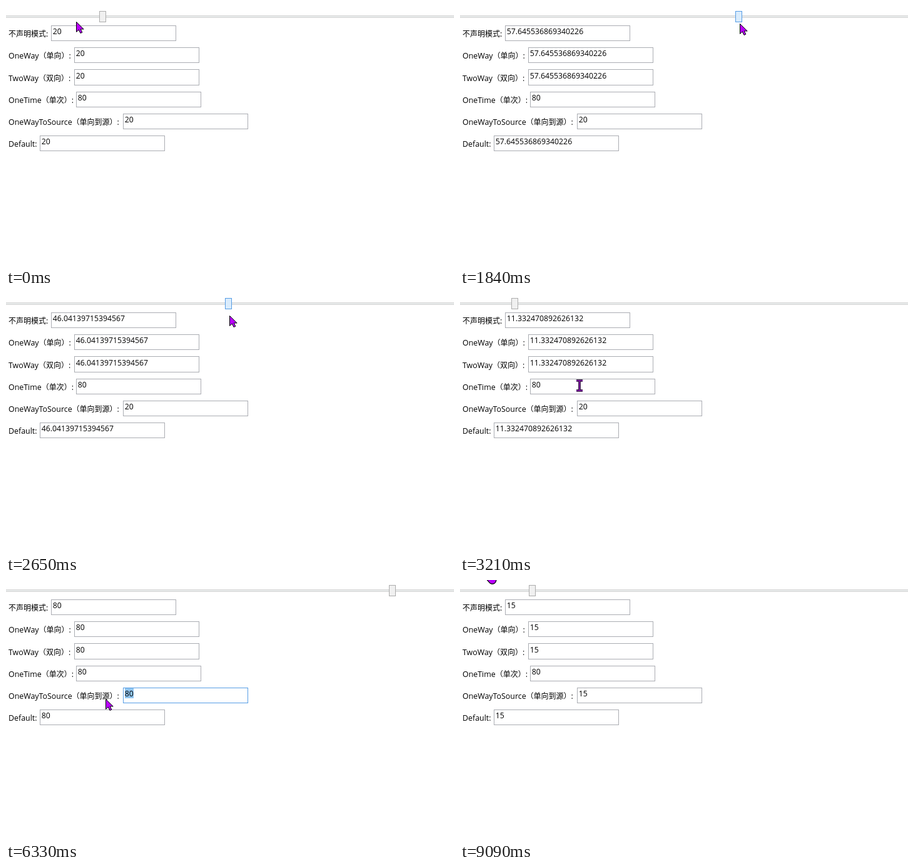
An HTML page that plays this animation: 716 by 414 pixels, repeating every 9.18 s.

```html
<!DOCTYPE html>
<html lang="zh-CN">
<head>
<meta charset="utf-8">
<title>Binding modes</title>
<style>
html, body { margin: 0; width: 100%; height: 100%; overflow: hidden; background: #fff; }
svg { display: block; }
text { font: 12.4px "Open Sans", "Noto Sans", sans-serif; fill: #000; white-space: pre; }
.value { font-size: 12.25px; }
.cjk { font: 12px "Noto Sans CJK SC", "Noto Sans CJK", sans-serif; }
rect { shape-rendering: crispEdges; }
</style>
</head>
<body>
<svg id="stage" width="716" height="414" viewBox="0 0 716 414"></svg>
<script>
const LOOP = 9180, STEPS = 100;
const ONCE = 3, SOURCE = 4;
const stage = document.getElementById('stage');

const ROWS = [
  { label: '不声明模式:', x: 72 },
  { label: 'OneWay（单向）:', x: 109 },
  { label: 'TwoWay（双向）:', x: 109 },
  { label: 'OneTime（单次）:', x: 112 },
  { label: 'OneWayToSource（单向到源）:', x: 187 },
  { label: 'Default:', x: 54 }
];

// Moments in the story, in steps
const GRAB = 15, RELEASE = 33, SELECT = 41, TYPE = 52, COMMIT = 60;
const RESELECT = 66, RETYPE = 75, RECOMMIT = 83, BLUR = 99;

// Pointer gestures: first step, last step, destination
const HOME = [112, 25];
const GESTURES = [
  [0, 3, 214, 180], [3, 6, 176, 15], [9, 14, 156, 15], [GRAB, 32, 89, 18],
  [RELEASE, 35, 191, 148], [35, 38, 208, 181], [SELECT, 42, 180, 186],
  [53, 58, 200, 149], [61, 64, 208, 181], [RESELECT, 69, 159, 190],
  [77, RECOMMIT, 192, 148], [87, 96, 51, 0]
];

// Slider values where the drag turns: step, value
const DRAG = [
  [GRAB, 20], [20, 57.645536869340226], [25, 5.510996119016816],
  [26, 7.183958602846054], [29, 46.04139715394567], [32, 11.332470892626132]
];

function set(node, attrs) {
  for (const key in attrs) node.setAttribute(key, attrs[key]);
}

function add(tag, attrs, parent = stage) {
  const node = document.createElementNS('http://www.w3.org/2000/svg', tag);
  set(node, attrs);
  return parent.appendChild(node);
}

function show(node, on) {
  node.style.display = on ? '' : 'none';
}

function frameRect(x, y, w, h, fill, stroke) {
  return add('rect', { x: x + 0.5, y: y + 0.5, width: w - 1, height: h - 1, fill, stroke });
}

frameRect(-2, 15, 720, 4, '#e7eaea', '#d6d6d6');
const thumb = frameRect(149, 8, 11, 18, '#f0f0f0', '#acacac');

ROWS.forEach((row, i) => {
  row.y = Math.round(31 + 35.2 * i);
  row.bottom = Math.round(56 + 35.25 * i);
  row.top = row.bottom - 25;
  const label = add('text', { x: 4, y: row.top + 18 });
  label.innerHTML = row.label.replace(/[^\x00-\x7f]+/g, '<tspan class="cjk">$&</tspan>');
  row.box = frameRect(row.x, row.y, 200, row.bottom - row.y, '#fff', '#abadb3');
});
const selection = add('rect', { height: 16, fill: '#90c5f0' });
for (const row of ROWS) {
  row.text = add('text', { x: row.x + 2.8, y: row.top + 14, class: 'value' });
}
const caret = add('rect', { width: 1, height: 15, fill: '#000' });

const PURPLE = '#b900ff';
const arrow = add('path', {
  d: 'M.5 .5V16.5L4.3 13L7 18.5L9.8 17.2L7.2 12H12.2Z',
  fill: PURPLE, stroke: '#000', 'stroke-linejoin': 'round'
});
const beam = add('g', { fill: 'none' });
const BEAM = 'M-5 -8H5M-5 8H5M0 -8V8';
add('path', { d: BEAM, stroke: '#140020', 'stroke-width': 3.6 }, beam);
add('path', { d: BEAM, stroke: '#8c14b4', 'stroke-width': 1.6 }, beam);
const hand = add('path', {
  d: 'M-7.5 -2V0L-4 4Q-3 6 0 6.3Q5 6.3 6.5 2L7.3 -2Z',
  fill: PURPLE, stroke: '#000', 'stroke-width': 1.2
});

const smooth = u => u * u * (3 - 2 * u);
const mix = (a, b, u) => a * (1 - u) + b * u;
const between = (s, a, b) => s >= a && s < b;
const dragging = s => between(s, GRAB, RELEASE);
const thumbX = value => 7.72 * value - 5.4;

function sliderValue(s) {
  if (s >= RECOMMIT) return 15;
  if (s >= COMMIT) return 80;
  let [start, value] = DRAG[0];
  for (const [end, target] of DRAG) {
    if (s >= end) value = target;
    else if (s > start) return mix(value, target, smooth((s - start) / (end - start)));
    start = end;
  }
  return value;
}

function pointer(s) {
  if (dragging(s)) {
    const dip = Math.exp(-(((s - 25) / 4.1) ** 2));
    return [thumbX(sliderValue(s)) + 7, 16 + 51 * dip];
  }
  let [x, y] = HOME;
  for (const [start, end, toX, toY] of GESTURES) {
    if (s <= start) break;
    const u = smooth(Math.min(1, (s - start) / (end - start)));
    x = mix(x, toX, u);
    y = mix(y, toY, u);
  }
  return [x, y];
}

function rowAt(s) {
  if (dragging(s)) return -1;
  const [x, y] = pointer(s);
  return ROWS.findIndex(r => between(x, r.x, r.x + 200) && between(y, r.y, r.bottom));
}

function sourceText(s) {
  if (s >= RETYPE) return '15'.slice(0, s - RETYPE + 1);
  if (s >= TYPE) return '80'.slice(0, s - TYPE + 1);
  return '20';
}

function focusRow(s) {
  if (!between(s, SELECT, BLUR)) return -1;
  return between(s, COMMIT, RESELECT) || s >= RECOMMIT ? ONCE : SOURCE;
}

function render(time) {
  // The screen refreshes in even steps
  const s = Math.min(STEPS - 1, Math.floor((time + 14) * STEPS / LOOP));
  const value = sliderValue(s);
  const hot = between(s, GRAB - 1, RELEASE + 1);
  const pressed = hot && s > GRAB;
  set(thumb, {
    x: Math.round(thumbX(value)) + 0.5,
    fill: hot ? '#daecfc' : '#f0f0f0',
    stroke: pressed ? '#569de5' : hot ? '#7eb4ea' : '#acacac'
  });

  // A box lights up once the pointer has stayed on it
  const over = rowAt(s), hover = over === rowAt(s - 1) ? over : -1;
  const focus = focusRow(s);
  ROWS.forEach((row, i) => {
    row.text.textContent = i === ONCE ? '80' : i === SOURCE ? sourceText(s) : String(value);
    row.box.setAttribute('stroke', i === focus ? '#569de5' : i === hover ? '#7eb4ea' : '#abadb3');
  });

  const selected = between(s, SELECT + 1, TYPE) || between(s, RESELECT + 1, RETYPE);
  show(selection, selected);
  show(caret, focus >= 0 && !selected);
  if (focus >= 0) {
    const row = ROWS[focus], width = row.text.getComputedTextLength();
    set(selection, { x: row.x + 3, y: row.top + 1, width: Math.round(width) });
    set(caret, { x: Math.round(row.x + 2.3 + width), y: row.top + 1 });
  }

  const [x, y] = pointer(s).map(Math.round);
  const shape = y <= 4 ? hand : over >= 0 ? beam : arrow;
  for (const node of [arrow, beam, hand]) show(node, node === shape);
  shape.setAttribute('transform', `translate(${x} ${y})`);
}

const begin = performance.now();
function tick() {
  render((performance.now() - begin) % LOOP);
  requestAnimationFrame(tick);
}
tick();
</script>
</body>
</html>
```
